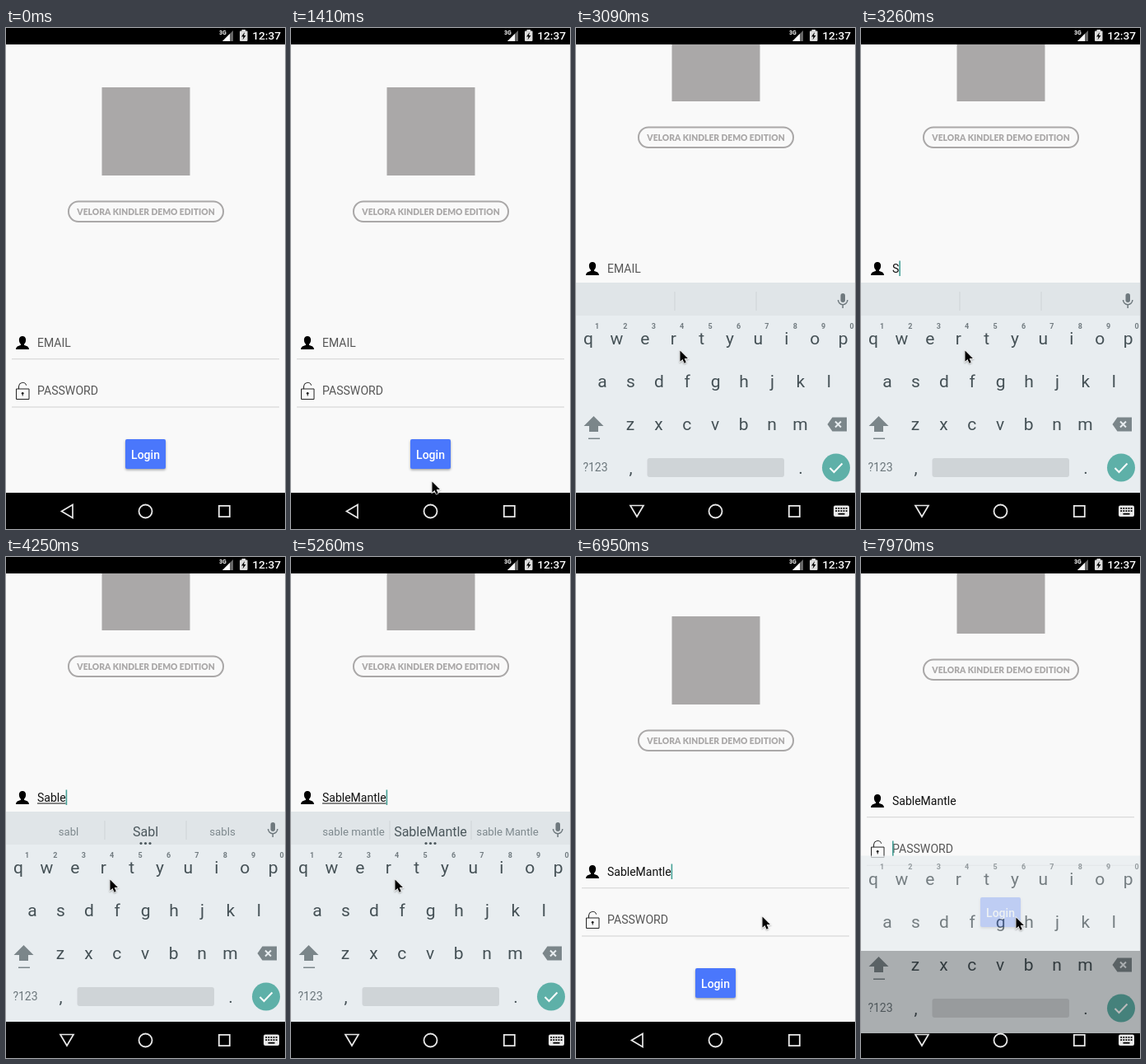
Animation of 339 by 608 pixels, one loop 8 s. Source, as an HTML page with a canvas:

```html
<!DOCTYPE html>
<html lang="en">
<head>
<meta charset="utf-8">
<title>Login screen</title>
<style>
html, body { margin: 0; width: 100%; height: 100%; overflow: hidden; background: #000; }
canvas { display: block; }
</style>
</head>
<body>
<canvas id="stage" width="339" height="608"></canvas>
<script>
const stage = document.getElementById('stage');
const screen2d = stage.getContext('2d');
const layer = stage.cloneNode();
const layer2d = layer.getContext('2d');
let ctx = screen2d;

const LOOP = 8000;
const TOP = 19.8, BOTTOM = 564;
const USER = 'SableMantle';
const KEY_TIMES = [3250, 3600, 3720, 3840, 4170, 4460, 4610, 4760, 4900, 5020, 5150];
const MOUSE = [[1470, 171, 550], [1810, 126, 391], [5690, 126, 391], [6190, 320, 540],
  [6570, 320, 540], [6950, 226, 436], [7170, 188, 437]];

const clamp = v => Math.max(0, Math.min(1, v));
const easeOut = v => 1 - (1 - clamp(v)) ** 2;
const smooth = v => v * v * (3 - 2 * v);
const within = (t, a, b) => t >= a && t < b;

function text(str, x, y, size, color, align = 'left', weight = 400, family = 'Roboto') {
  ctx.font = `${weight} ${size}px ${family}, sans-serif`;
  ctx.textAlign = align;
  ctx.fillStyle = color;
  ctx.fillText(str, x, y);
}
function rect(x, y, w, h, color, r = 0) {
  ctx.fillStyle = color;
  ctx.beginPath();
  ctx.roundRect(x, y, w, h, r);
  ctx.fill();
}
function disc(x, y, r, color) {
  ctx.fillStyle = color;
  ctx.beginPath();
  ctx.arc(x, y, r, 0, 7);
  ctx.fill();
}
function fillPath(d, color) {
  ctx.fillStyle = color;
  ctx.fill(new Path2D(d));
}
function strokePath(d, color, width) {
  ctx.strokeStyle = color;
  ctx.lineWidth = width;
  ctx.stroke(new Path2D(d));
}

function mouseAt(t) {
  let i = 0;
  while (i < MOUSE.length - 1 && t >= MOUSE[i + 1][0]) i++;
  const [t0, x0, y0] = MOUSE[i];
  const [t1, x1, y1] = MOUSE[i + 1] || [t0 + 1, x0, y0];
  const k = smooth(clamp((t - t0) / (t1 - t0)));
  return [x0 + (x1 - x0) * k, y0 + (y1 - y0) * k];
}

const typed = t => USER.slice(0, KEY_TIMES.filter(k => t >= k).length);

function caret(x, y) {
  rect(x, y - 9.5, 1.6, 18.5, '#45a197');
}

function page(t, shift) {
  ctx.save();
  ctx.beginPath();
  ctx.rect(0, TOP, 339, BOTTOM - TOP);
  ctx.clip();
  ctx.translate(0, -shift);
  rect(0, 0, 339, BOTTOM, '#f9f9f9');

  rect(116.5, 72, 107, 107, '#aaa8a8');
  ctx.strokeStyle = '#aaa8a8';
  ctx.lineWidth = 2;
  ctx.beginPath();
  ctx.roundRect(76, 210.5, 188, 24.5, 12);
  ctx.stroke();
  text('VELORA KINDLER DEMO EDITION', 170, 226.5, 10.3, '#aaa8a8', 'center', 900, 'Lato');

  // person
  fillPath('M20 374c3 0 4.3 2.2 4.1 5-.1 2-1 3.5-2 4.5v1.5c3 .8 5.9 1.8 5.9 5H12c0-3.2 2.9-4.2 5.9-5v-1.5c-1-1-1.9-2.5-2-4.5-.2-2.8 1.1-5 4.1-5z', '#000');
  // open padlock
  strokePath('M12.5 438h15.500v12.500h-15.500zM15.500 438v-3a4.700 4.700 0 0 1 9.200-1.300', '#222', 1);
  disc(20.2, 443.3, 1.4, '#222');
  rect(19.7, 443.3, 1, 3.2, '#222');

  const name = typed(t);
  text(name || 'EMAIL', 38, 387, 14, name ? '#111' : '#575757');
  const width = name ? ctx.measureText(name).width : 0;
  if (within(t, 3370, 6360)) rect(38, 388.5, width, 1, '#111');
  if (within(t, 2220, 2720) || within(t, 3220, 5680) || within(t, 6190, 7170)) {
    caret(38 + width, 382);
  }
  text('PASSWORD', 38, 445, 14.1, '#575757');
  if (t >= 7710) caret(38, 440);
  rect(7, 401.3, 325, 1, '#d2d2d2');
  rect(7, 459.6, 325, 1, '#d2d2d2');

  ctx.shadowColor = 'rgba(0,0,0,.35)';
  ctx.shadowBlur = 3;
  ctx.shadowOffsetY = 1.5;
  rect(145, 499, 49, 36, '#4a77fc', 2);
  ctx.shadowColor = 'transparent';
  text('Login', 169.5, 522.5, 14, '#fff', 'center', 500);
  ctx.restore();
}

function suggestions(t) {
  rect(0, 309, 339, 40, '#e0e5e8');
  rect(119.5, 320, 1, 23, '#cdd3d6');
  rect(218.5, 320, 1, 23, '#cdd3d6');
  rect(321.5, 322, 5.5, 11, '#6f797e', 2.75);
  strokePath('M318.5 330a5.7 5.7 0 0 0 11.4 0M324.2 336v4', '#6f797e', 1.5);
  const word = typed(t - 110);
  if (!word) return;
  const first = word.slice(0, 5).toLowerCase(), second = word.slice(5);
  const gap = second && ' ';
  text(first + gap + second.toLowerCase(), 76, 338, 13.2, '#7d888d', 'center');
  text(word, 169.5, 338.5, 16, '#4b575c', 'center');
  text(second ? first + gap + second : first + 's', 263, 338, 13.2, '#7d888d', 'center');
  for (const x of [164, 169.5, 175]) disc(x, 347.5, 1.6, '#4b575c');
}

function keyRow(letters, x, y) {
  [...letters].forEach((c, i) => text(c, x + i * 34.4, y, 21, '#455156', 'center'));
}

function keys(t) {
  rect(0, 348.5, 339, BOTTOM - 348.5, '#e8edf0');
  if (t < 7200) suggestions(t);
  keyRow('qwertyuiop', 15, 384);
  keyRow('asdfghjkl', 32, 436);
  keyRow('zxcvbnm', 66, 488);
  [...'1234567890'].forEach((d, i) => text(d, 25.5 + i * 34.4, 365, 9, '#727c81', 'center', 700));

  fillPath('M21.5 471l12 12h-6.5v7h-11v-7h-6.5z', '#7b868a');
  rect(15, 497.5, 14, 1.5, '#7b868a');
  fillPath('M305.5 481l6-8.5h17.5v17h-17.5z', '#7b868a');
  strokePath('M315 477.5l7 7m0-7l-7 7', '#e8edf0', 2);

  text('?123', 23.5, 538, 14, '#6c777c', 'center');
  text(',', 66.5, 541, 21, '#455156', 'center');
  text('.', 273, 541, 21, '#455156', 'center');
  rect(86.5, 522, 166.5, 23, '#cfd4d7', 3);
  disc(316, 533.5, 17, within(t, 6360, 6800) ? '#458f88' : '#5eb0a8');
  strokePath('M308.5 534l5 5 10-10.5', '#fff', 2);
}

// drawn on its own layer so that it fades as one piece
function keyboard(t, amount) {
  if (amount <= 0) return;
  ctx = layer2d;
  ctx.clearRect(0, 0, 339, 608);
  keys(t);
  ctx = screen2d;
  ctx.globalAlpha = amount;
  ctx.drawImage(layer, 0, Math.round(52 * (1 - amount)));
  ctx.globalAlpha = 1;
}

function statusBar() {
  rect(0, 0, 339, TOP, '#000');
  fillPath('M276 3v13h-13z', '#666');
  fillPath('M272 7v9h-9z', '#fff');
  text('3G', 259, 8, 7, '#fff', 'left', 700);
  rect(284, 3.5, 9.5, 12.5, '#ddd', 1);
  rect(286.5, 2, 4.5, 2, '#ddd');
  fillPath('M290 5l-4 5.5h2.5l-1 4 4-5.5h-2.5z', '#000');
  text('12:37', 334, 14, 13.7, '#fff', 'right', 500);
}

function navBar(imeOpen) {
  const white = '#e8e8e8';
  strokePath(imeOpen ? 'M66 579.5h16l-8 13.5z' : 'M67.5 586.5l13.5-8v16z', white, 1.7);
  strokePath('M161.5 586.5a8 8 0 1 0 16 0a8 8 0 1 0-16 0z', white, 1.8);
  strokePath('M258.8 579.8h13v13.4h-13z', white, 1.8);
  if (!imeOpen) return;
  rect(313, 579.5, 19, 13.5, white, 2);
  for (let i = 0; i < 10; i++) {
    rect(315.3 + (i % 5) * 3.1, 582 + Math.floor(i / 5) * 3.2, 1.8, 1.8, '#000');
  }
  rect(318.5, 588.8, 8, 1.8, '#000');
}

function pointer(t) {
  if (t < 1410) return;
  ctx.save();
  ctx.translate(...mouseAt(t));
  ctx.scale(0.92, 0.92);
  ctx.shadowColor = 'rgba(0,0,0,.35)';
  ctx.shadowBlur = 2;
  ctx.shadowOffsetY = 1;
  const arrow = 'M.5.5v14.5l3.3-3 2.2 5 2.4-1-2.2-5h4.6z';
  strokePath(arrow, '#fff', 1.6);
  ctx.shadowColor = 'transparent';
  fillPath(arrow, '#000');
  ctx.restore();
}

function draw(now) {
  const t = now % LOOP;
  // the phone repaints its window transitions every 60 ms
  const step = Math.floor((t - 2690) / 60) * 60 + 2690;
  const reopening = t >= 7200;
  const shift = reopening
    ? 108 * easeOut((step - 7833) / 250)
    : 90 * (easeOut((step - 2650) / 250) - easeOut((step - 6570) / 250));
  const ime = reopening
    ? clamp((step - 7860) / 150)
    : clamp((step - 2800) / 150) - clamp((step - 6510) / 180);

  rect(0, 0, 339, 608, '#000');
  page(t, shift);
  keyboard(t, ime);
  statusBar();
  navBar(within(t, 2460, 6510) || t >= 7800);
  pointer(t);
  requestAnimationFrame(draw);
}
requestAnimationFrame(draw);
</script>
</body>
</html>
```
